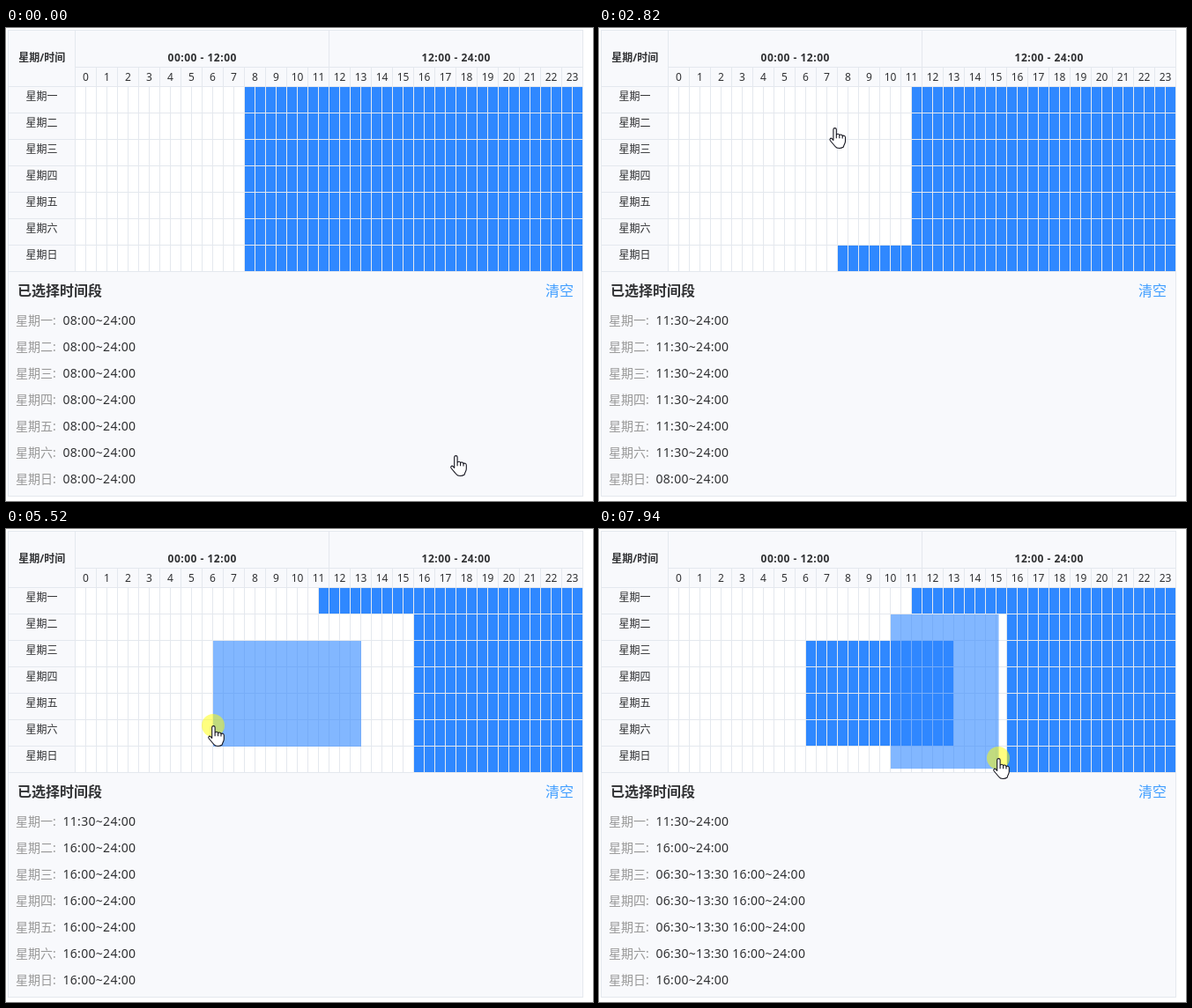
Recreate the animation shown at these times as an HTML page. Size 666 by 537 pixels, loop 8 s.

```html
<!DOCTYPE html>
<html lang="zh-CN">
<head>
<meta charset="utf-8">
<title>时间段选择</title>
<style>
html, body { margin: 0; width: 100%; height: 100%; overflow: hidden; background: #fff; }
svg { display: block; }
text {
  font-family: "Noto Sans", "Noto Sans CJK SC", "Noto Sans CJK", sans-serif;
  font-size: 12px; fill: #303133; white-space: pre;
}
.mid { text-anchor: middle; }
.bold { font-weight: 700; }
.range { letter-spacing: .5px; }
.title { font-size: 16px; }
.clear { font-size: 16px; fill: #409eff; }
.day { font-size: 14px; fill: #999; }
.slot { font-size: 14px; letter-spacing: .3px; }
.lines { fill: none; stroke: #e4e8ee; }
.crisp { shape-rendering: crispEdges; }
</style>
</head>
<body>
<svg id="stage" width="666" height="537" viewBox="0 0 666 537"></svg>
<script>
const LOOP = 8000, STEP = 76.5, FADE = 200;
const LEFT = 79, TOP = 67, COL = 12, ROW = 30, COLS = 48, ROWS = 7;
const BLUE = '#2f88ff', PANEL = '#f8f9fc';
const DAYS = [...'一二三四五六日'].map(d => '星期' + d);

// Each act moves the pointer to x, y; a drag also sweeps cells [column, row]
// and switches them on or off when the next act begins
const ACTS = [
  { at: 0, ms: 1, x: 510, y: 485 },
  { at: 70, ms: 560, x: 139, y: 93 },
  { at: 900, ms: 500, x: 344, y: 220, drag: { from: [5, 0], to: [22, 5], ms: 1070, on: 0 } },
  { at: 2130, ms: 840, x: 260, y: 103 },
  { at: 3050, ms: 460, x: 457, y: 274, drag: { from: [15, 1], to: [31, 6], ms: 690, on: 0 } },
  { at: 4050, ms: 750, x: 391, y: 136 },
  { at: 4940, ms: 460, x: 235, y: 223, drag: { from: [26, 2], to: [13, 5], ms: 535, on: 1 } },
  { at: 5690, ms: 720, x: 352, y: 107 },
  { at: 6540, ms: 90, x: 343, y: 97 },
  { at: 6770, ms: 930, x: 453, y: 260, drag: { from: [21, 1], to: [31, 6], ms: 1370, on: 1 } }
];

const stage = document.getElementById('stage');
const NS = 'http://www.w3.org/2000/svg';

function set(el, attrs) {
  for (const k in attrs) el.setAttribute(k, attrs[k]);
  return el;
}
function add(tag, attrs, text = '', parent = stage) {
  const el = set(document.createElementNS(NS, tag), attrs);
  el.textContent = text;
  return parent.appendChild(el);
}
const box = (x, y, width, height, fill) =>
  add('rect', { x, y, width, height, fill, class: 'crisp' });
const label = (x, y, text, cls) => add('text', { x, y, class: cls }, text);

// Chosen cells as they stand at the start of each act
const between = (v, a, b) => v >= Math.min(a, b) && v <= Math.max(a, b);
let week = DAYS.map(() => Array.from({ length: COLS }, (_, c) => +(c >= 16)));
for (const act of ACTS) {
  act.week = week;
  if (!act.drag) continue;
  const { from, to, on } = act.drag;
  week = week.map((day, r) => day.map((v, c) =>
    between(c, from[0], to[0]) && between(r, from[1], to[1]) ? on : v));
}

// Panel and cells
box(2, 2, 653, 530, PANEL);
box(LEFT, TOP, COLS * COL, ROWS * ROW, '#fff');
const cells = DAYS.map((_, r) => week[r].map((_, c) =>
  box(LEFT + c * COL, TOP + r * ROW, COL, ROW, BLUE)));

// Rules
const hline = (x1, x2, y) => `M${x1} ${y + .5}H${x2}`;
const vline = (x, y1, y2) => `M${x + .5} ${y1}V${y2}`;
let rules = hline(2, 655, 2) + hline(2, 655, 531) + hline(78, 655, 44) +
  vline(2, 2, 532) + vline(654, 2, 532) + vline(78, 2, 277) + vline(366, 2, 67);
for (let r = 0; r <= ROWS; r++) rules += hline(2, 655, 66 + r * ROW);
for (let c = 1; c < COLS; c++) rules += vline(78 + c * COL, c % 2 ? 67 : 44, 277);
add('path', { d: rules, class: 'lines crisp' });

// Text
label(40.7, 38, '星期/时间', 'mid bold');
label(222.7, 38, '00:00 - 12:00', 'mid bold range');
label(510.7, 38, '12:00 - 24:00', 'mid bold range');
for (let h = 0; h < 24; h++) label(90.5 + h * 24, 60, String(h), 'mid');
label(13, 304, '已选择时间段', 'title bold');
label(612, 304, '清空', 'clear');
const slots = DAYS.map((d, r) => {
  label(40.5, 82 + r * ROW, d, 'mid');
  label(11, 337 + r * ROW, d + ':', 'day');
  return label(64.5, 337 + r * ROW, '', 'slot');
});

// Selection, press mark and hand
const area = add('rect', { fill: BLUE, opacity: .6 });
const pointer = add('g', {});
const mark = add('circle', { r: 13, fill: '#ff0', opacity: .5 }, '', pointer);
add('path', {
  transform: 'translate(-6 0)',
  fill: '#fff', stroke: '#15151f', 'stroke-width': 1.1, 'stroke-linejoin': 'round',
  d: 'M4.7 2.3a1.7 1.7 0 0 1 3.4 0V8.7C8.6 6.6 11.6 6.8 11.6 9C12.2 7.4 14.9 7.6 15 9.9' +
    'C15.7 8.6 18.3 9 18.3 11.2V15.5C18.3 18 16.5 19.5 16.2 22Q14 23.5 11.5 23.5' +
    'Q8 23.5 6.8 21.5L1.3 15C-.2 13 1.8 11.3 3.3 12.8L4.7 14.3Z' +
    'M4.7 14.3V8M8.1 8.7V12.3M11.6 9V12.3M15 9.9V12.6'
}, '', pointer);

const mix = (a, b, u) => a + (b - a) * u;
const smooth = u => u * u * (3 - 2 * u);
const clock = i => String(i >> 1).padStart(2, '0') + (i % 2 ? ':30' : ':00');

// Runs of chosen cells as readable time spans
function spans(day) {
  const edges = [];
  for (let c = 0; c <= COLS; c++) if ((day[c] || 0) !== (day[c - 1] || 0)) edges.push(clock(c));
  return edges.map((e, i) => e + (i % 2 ? ' ' : '~')).join('').trim();
}

// The box trails the pointer, its width further behind than its height
function showArea({ from, to, ms }, time) {
  const high = Math.sin(Math.min(1, time / ms) * Math.PI / 2), wide = high ** 2.5;
  const width = COL * (1 + Math.abs(to[0] - from[0]) * wide);
  const height = ROW * (1 + (to[1] - from[1]) * high);
  const x = LEFT + from[0] * COL + (to[0] < from[0] ? COL - width : 0);
  set(area, { x, y: TOP + from[1] * ROW, width, height });
}

function draw(n, time) {
  const act = ACTS[n], prev = ACTS[Math.max(0, n - 1)];
  const fade = Math.min(1, (time + STEP) / FADE);
  cells.forEach((line, r) => {
    line.forEach((el, c) => set(el, { opacity: mix(prev.week[r][c], act.week[r][c], fade) }));
    slots[r].textContent = spans(act.week[r]);
  });

  const visibility = act.drag ? 'visible' : 'hidden';
  set(area, { visibility });
  set(mark, { visibility });
  if (act.drag) showArea(act.drag, time);

  const u = smooth(Math.min(1, time / act.ms));
  const x = mix(prev.x, act.x, u).toFixed(1), y = mix(prev.y, act.y, u).toFixed(1);
  set(pointer, { transform: `translate(${x} ${y})` });
}

const begin = performance.now();
function tick() {
  const t = (performance.now() - begin) % LOOP;
  const n = ACTS.filter(a => a.at <= t).length - 1;
  // The picture advances in even steps within each act
  draw(n, Math.floor((t - ACTS[n].at) / STEP) * STEP);
  requestAnimationFrame(tick);
}
tick();
</script>
</body>
</html>
```
